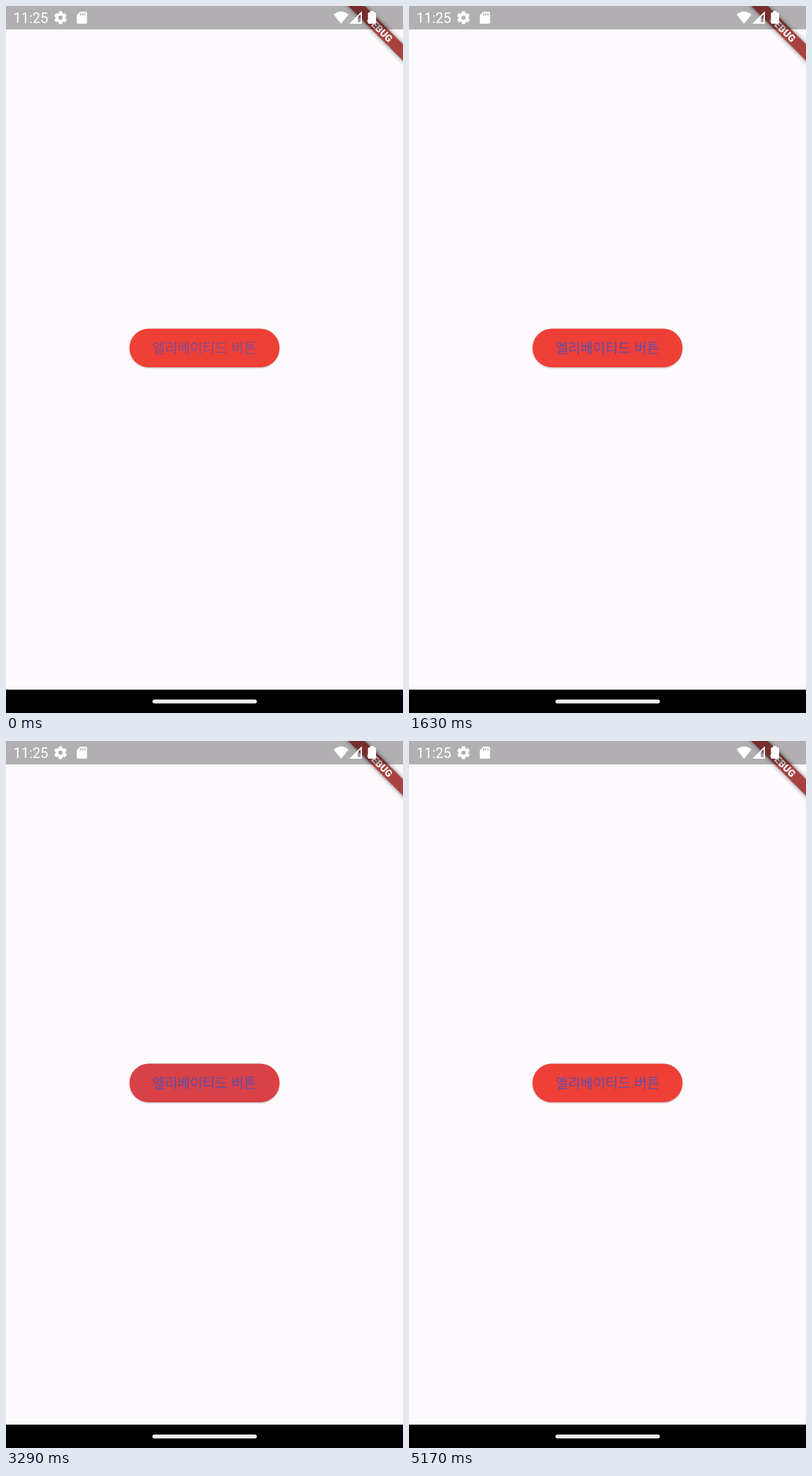
An HTML page for the animation above (5.3 s loop, 561x998 px).

```html
<!DOCTYPE html>
<html lang="ko">
<meta charset="utf-8">
<style>
  html, body { margin: 0; width: 100%; height: 100%; overflow: hidden; background: #fdfafd }
  svg { display: block }
  text { font-family: Roboto, sans-serif; fill: #fff }
  .label { font: 19.1px "Noto Sans CJK KR", "Noto Sans CJK", sans-serif; letter-spacing: .13px; fill: #5a4fae }
  .button { filter: drop-shadow(0 1px 1px rgba(0, 0, 0, .28)) }
  .ribbon { filter: drop-shadow(0 0 3px rgba(0, 0, 0, .5)) }
</style>
<svg width="561" height="998" viewBox="0 0 561 998">
  <defs>
    <clipPath id="pill"><rect x="174.5" y="455.5" width="212" height="54.5" rx="27.25"/></clipPath>
    <radialGradient id="glow">
      <stop offset=".7" stop-color="#4c4cae"/>
      <stop offset="1" stop-color="#4c4cae" stop-opacity="0"/>
    </radialGradient>
  </defs>
  <rect width="561" height="998" fill="#fdfafd"/>

  <rect class="button" x="174.5" y="455.5" width="212" height="54.5" rx="27.25" fill="#ee4037"/>
  <g clip-path="url(#pill)">
    <rect id="tint" x="174" y="455" width="213" height="56" fill="#4c4cae" opacity="0"/>
    <circle id="ripple" cx="272" cy="484" r="0" fill="url(#glow)" opacity="0"/>
  </g>
  <text id="label" class="label" x="280.5" y="489.5" text-anchor="middle">엘리베이티드 버튼</text>

  <g transform="translate(561) rotate(45)">
    <rect class="ribbon" x="-60" y="38.2" width="120" height="16.4" fill="#a8423f"/>
    <text y="51.3" font-size="13.9" font-weight="900" text-anchor="middle">DEBUG</text>
  </g>
  <rect width="561" height="33" fill="#000" opacity=".3"/>

  <g fill="#fff">
    <text x="10.5" y="24" font-size="19.7">11:25</text>
    <g transform="translate(77 16.5)">
      <circle r="5" fill="none" stroke="#fff" stroke-width="4"/>
      <g id="teeth"></g>
    </g>
    <path d="M105 8h7.500q2 0 2 2v13q0 2-2 2h-10.500q-2 0-2-2v-10z"/>
    <path d="M105.500 10v3.500m3-3.500v3.500m3-3.500v3.500" stroke="#b2b1b3" stroke-width="1.500"/>
    <path d="M473.500 25L463 12q10.500-8.500 21 0z"/>
    <path d="M487.500 24L502 9.500V24z" fill="none" stroke="#fff" stroke-width="1.800"/>
    <path d="M487 24.500L497 14.500V24.500z"/>
    <path d="M514.500 7h5v2h2q1.500 0 1.500 1.500v13q0 1.500-1.500 1.500h-8.500q-1.500 0-1.500-1.500v-13q0-1.500 1.500-1.500h1.500z"/>
  </g>

  <rect y="965" width="561" height="33"/>
  <rect x="207" y="979" width="147.500" height="5.500" rx="2.750" fill="#f0f0ee"/>
</svg>
<script>
  const LOOP = 5300;
  // Each tap: press, release and end time in ms
  const TAPS = [[1210, 1330, 1610], [2420, 2920, 3800], [4380, 4600, 5100]];
  const $ = id => document.getElementById(id);
  const ramp = (t, from, to) => Math.min(1, Math.max(0, (t - from) / (to - from)));

  $("teeth").innerHTML = Array.from({ length: 6 }, (_, i) =>
    `<rect x="-2.500" y="-9" width="5" height="4" rx="1" transform="rotate(${i * 60})"/>`).join("");

  function draw(now) {
    const t = now % LOOP;
    const tap = TAPS.find(([press, , end]) => t >= press && t < end);
    let grow = 0, fade = 0, tint = 0;
    if (tap) {
      const [press, release, end] = tap;
      grow = ramp(t, press, press + 500);
      fade = 1 - ramp(t, release, end);
      tint = ramp(t, press, press + 150);
    }
    $("tint").setAttribute("opacity", .1 * tint * fade);
    $("ripple").setAttribute("r", 30 + 110 * (1 - (1 - grow) ** 2));
    $("ripple").setAttribute("opacity", .13 * tint * fade);
    $("label").setAttribute("opacity", t < 130 ? .75 : 1);
    requestAnimationFrame(draw);
  }
  requestAnimationFrame(draw);
</script>
</html>
```
